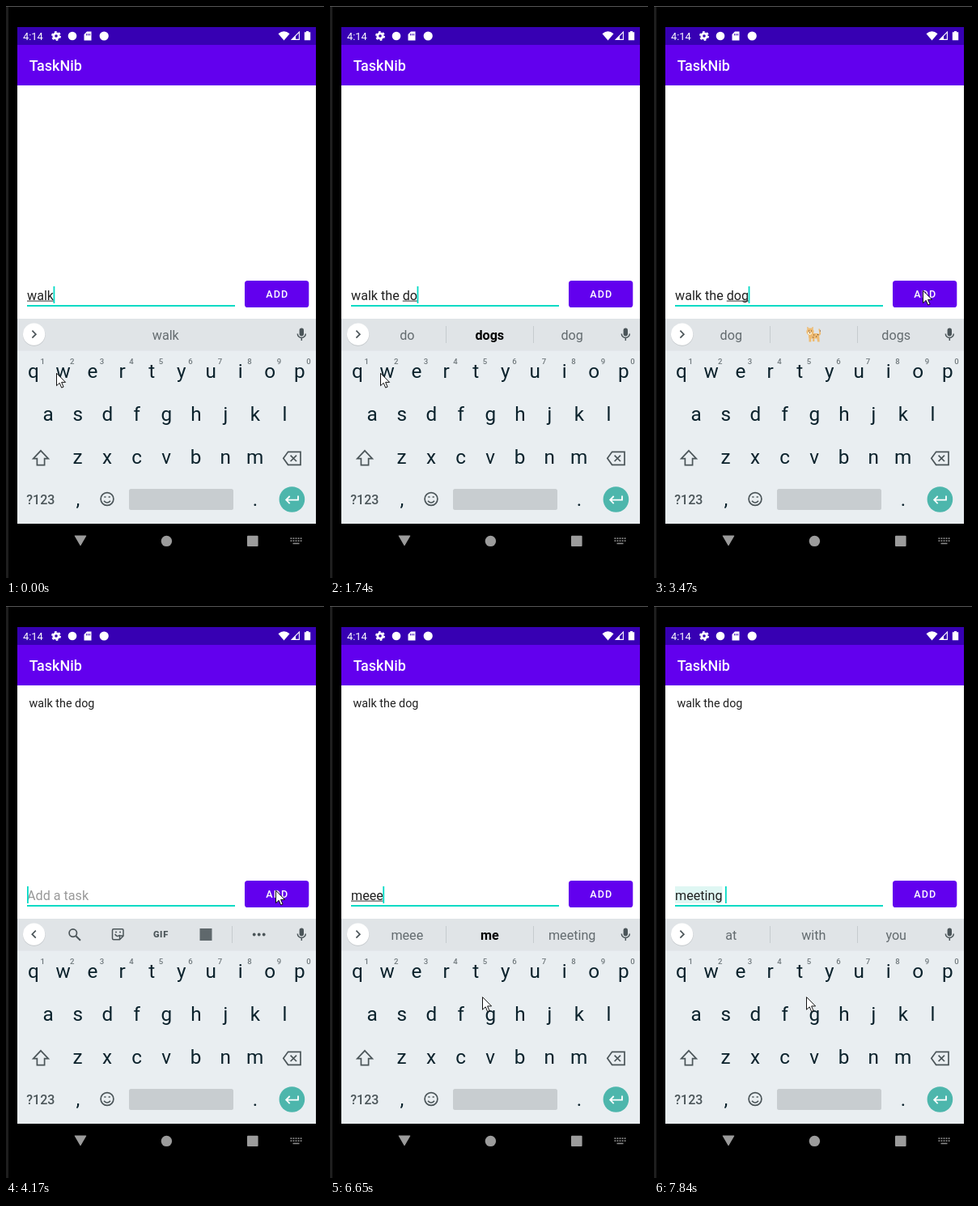
An HTML page that plays this animation: 393x706 px, repeating every 7.99 s.

```html
<!DOCTYPE html>
<html lang="en">
<head>
<meta charset="utf-8">
<title>Task list</title>
<style>
  html, body { margin: 0; width: 100%; height: 100%; overflow: hidden; background: #000; }
  svg { display: block; width: 393px; height: 706px; font-family: Roboto, sans-serif; }
  text { white-space: pre; }
  .mid { text-anchor: middle; }
  .line { fill: none; stroke: #4b5559; stroke-width: 1.7; }
</style>
</head>
<body>
<svg viewBox="0 0 393 706" xmlns="http://www.w3.org/2000/svg">
  <defs>
    <g id="mic" fill="#4b5559">
      <rect x="-2.7" y="-7.5" width="5.4" height="10" rx="2.7"/>
      <path d="M-5-.6a5 5 0 0 0 10 0M0 4.4V8" class="line" style="stroke-width:1.5"/>
    </g>
  </defs>
  <rect width="393" height="706"/>
  <path d="M0 .5H393" stroke="#555"/>
  <path d="M1.5 1V706" stroke="#1e1e1e" stroke-width="3"/>

  <!-- status bar -->
  <path fill="#3700b3" d="M14 26H383V48H14z"/>
  <g fill="#fff">
    <text x="21" y="42" font-size="12.8">4:14</text>
    <circle cx="62" cy="37" r="3.2" fill="none" stroke="#fff" stroke-width="2.8"/>
    <circle cx="62" cy="37" r="5.1" fill="none" stroke="#fff" stroke-width="1.8" stroke-dasharray="2.67"/>
    <circle cx="82" cy="37" r="5.3"/>
    <path d="M100 31.5h5.5v11h-9v-7.5z"/>
    <path d="M99.6 34.2v2.2M101.6 34.2v2.2M103.6 34.2v2.2" stroke="#3700b3" stroke-width="1"/>
    <circle cx="121.2" cy="37" r="5.6"/>
    <path d="M336.5 34.2Q343.5 28.5 350.5 34.2L343.5 42.5z"/>
    <path d="M362.4 32.2V41.4H353.2z" fill="none" stroke="#fff" stroke-width="1.1"/>
    <path d="M358 36.6V42H352.5z"/>
    <path d="M371 31h3v1.2h2.2V42.2h-7.4V32.2H371z"/>
  </g>

  <!-- app -->
  <path fill="#6200ee" d="M14 48H383V98H14z"/>
  <text x="28.7" y="79.7" font-size="17.94" font-weight="500" fill="#fff">TaskNib</text>
  <path fill="#fff" d="M14 98H383V386H14z"/>
  <text id="item" x="28.4" y="125" font-size="14.35" fill="#212121">walk the dog</text>
  <rect id="mark" x="26" y="346" height="21" fill="#dff7f3"/>
  <text id="entry" x="26" y="362.6" font-size="16.15"/>
  <rect id="under" y="363.6" height="1" fill="#333"/>
  <rect id="caret" y="346" width="1.8" height="21" fill="#03dac5"/>
  <path fill="#03dac5" d="M26 369H283V371H26z"/>
  <rect id="shade" x="293.5" y="339" width="82" height="36" rx="5" fill="#000"/>
  <rect x="295" y="339" width="79.3" height="33" rx="3.6" fill="#6200ee"/>
  <rect id="ripple" x="295" y="339" width="79.3" height="33" rx="3.6" fill="#fff"/>
  <text class="mid" x="335.3" y="360.2" font-size="12.56" font-weight="500" letter-spacing="1.12" fill="#fff">ADD</text>

  <!-- keyboard -->
  <path fill="#e0e4e7" d="M14 386H383V426H14z"/>
  <path fill="#e9eef1" d="M14 425.5H383V639H14z"/>
  <circle cx="34.7" cy="406" r="13.9" fill="#c9cdd0"/>
  <circle cx="34.6" cy="405.2" r="13.6" fill="#fff"/>
  <path id="chevron" class="line"/>
  <use href="#mic" x="365.3" y="405"/>

  <g id="words">
    <path id="bars" d="M143.5 395V416M251.5 395V416" stroke="#c6cbce"/>
    <text class="mid word" x="95.3" y="412"/>
    <text class="mid word" x="197.3" y="412"/>
    <text class="mid word" x="299.2" y="412"/>
    <g id="pet" fill="#eebb72">
      <circle cx="193" cy="402" r="4.6"/>
      <path d="M189 396l2.5 1-2 2.5zM197 396l-2.5 1 2 2.5z"/>
      <rect x="191" y="404" width="13" height="6.6" rx="2.5"/>
      <path d="M191.5 409v5.5h2.8V409zM196 409v5h2.4V409zM201 408l1 6.5h2.7l-.5-7z"/>
      <path d="M203 406.5q3-1 2-4t-.5-4" fill="none" stroke="#eebb72" stroke-width="1.8"/>
      <ellipse cx="192.5" cy="404" rx="2.6" ry="1.8" fill="#fff0d2"/>
      <path d="M191 401h1M194 401h1M192 403.3h1.2M197 406h1.2M200 408h1.2M202 405.6h1.2M196 409h1.2M205 401h1" stroke="#68432a" stroke-width="1.2"/>
    </g>
  </g>

  <g id="tools">
    <circle cx="82.8" cy="403.6" r="4.7" class="line"/>
    <path d="M86.3 407.2L92 412.8" class="line" style="stroke-width:2"/>
    <path d="M133 398.8h10.5q1.5 0 1.5 1.5v7l-4.5 4.5H133q-1.5 0-1.5-1.5v-10q0-1.5 1.5-1.5zM145 407h-4.5v4.5M134.7 405q2.7 4.5 6 1" class="line" style="stroke-width:1.5"/>
    <path d="M135 402.5h2M140 402.5h2" class="line"/>
    <text class="mid" x="191.4" y="409.2" font-size="11" font-weight="900" letter-spacing=".7" fill="#4b5559">GIF</text>
    <rect x="239.5" y="398" width="15" height="15" fill="#5f686c"/>
    <path d="M279.5 395V416" stroke="#c6cbce"/>
    <g fill="#4b5559"><circle cx="306.7" cy="405.5" r="1.9"/><circle cx="312.7" cy="405.5" r="1.9"/><circle cx="318.7" cy="405.5" r="1.9"/></g>
  </g>

  <g id="keys" class="mid" fill="#0b222c" font-size="24.3"></g>
  <path class="line" d="M43 548.8L52.3 558.6H47.6V566.6H38.4V558.6H33.7z"/>
  <path class="line" d="M348.6 550.3H364V566.3H348.6L342.8 558.3zM351.6 554.6l7.4 7.4M359 554.6l-7.4 7.4"/>
  <text class="mid" x="42.8" y="614.6" font-size="16" font-weight="500" fill="#4b5559">?123</text>
  <circle cx="125" cy="608.5" r="7.9" class="line"/>
  <path class="line" d="M121 610.7q4 4.6 8 0M121.3 606h2.2M126.6 606h2.2"/>
  <rect x="152" y="596" width="129" height="26" rx="2.5" fill="#c8cdd0"/>
  <circle cx="353.4" cy="609" r="15.8" fill="#4db6ac"/>
  <path d="M361 604.5V609.6H346.6M350.7 605L346.2 609.6L350.7 614.2" fill="none" stroke="#fff" stroke-width="1.8"/>

  <!-- navigation -->
  <g fill="#9c9c9c">
    <path d="M85.3 654H98.7L92 665.5z" stroke="#9c9c9c" stroke-width="1.2" stroke-linejoin="round"/>
    <circle cx="198.4" cy="660.4" r="6.7"/>
    <rect x="298" y="653.7" width="13.6" height="13.4" rx="1"/>
  </g>
  <path d="M351.5 657.2H365.5M351.5 660.2H365.5" stroke="#888" stroke-width="1.7" stroke-dasharray="1.8 1.25"/>
  <path d="M354.5 663.4H362.5" stroke="#888" stroke-width="1.6"/>

  <path id="pointer" d="M.5 .7V16.2L4.2 12.8L6.7 18.6L9.1 17.6L6.6 11.9H11.6z" fill="#fff" stroke="#111" stroke-width="1"/>
</svg>
<script>
const $ = id => document.getElementById(id);
const LOOP = 7990, LEFT = 26;

// Keyboard letters
const addKey = (char, x, y, extra = "") =>
  $("keys").insertAdjacentHTML("beforeend", `<text x="${x}" y="${y}" ${extra}>${char}</text>`);
const addRow = (chars, x, y) => [...chars].forEach((c, i) => addKey(c, x + i * 36.53, y));
addRow("qwertyuiop", 34, 459.3);
addRow("asdfghjkl", 52.2, 512.2);
addRow("zxcvbnm", 88.5, 565.3);
[..."1234567890"].forEach((c, i) =>
  addKey(c, 45.3 + i * 36.53, 441.8, 'font-size="9.6" font-weight="500" fill="#70797d"'));
addKey(",", 89, 617);
addKey(".", 308, 617);

// Each step changes only the listed fields; "done" is plain text, "comp" is underlined.
const steps = [
  [0, { done: "", comp: "walk", caret: 1, words: ["", "walk", ""], bold: 0, mouse: [62, 452.5], press: 0, item: 0, tools: 0, mark: 0 }],
  [120, { done: "walk ", comp: "", words: ["the", "with", "to"] }],
  [370, { comp: "t" }],
  [520, { comp: "th", words: ["th", "the", "through"], bold: 1 }],
  [820, { comp: "the", words: ["the", "they", "then"], bold: 0 }],
  [940, { done: "walk the ", comp: "", words: ["dog", "dogs", "house"] }],
  [1370, { caret: 0 }],
  [1620, { comp: "d", caret: 1, words: ["d", "dog", "dogs"] }],
  [1740, { comp: "do", words: ["do", "dogs", "dog"], bold: 1 }],
  [2170, { comp: "dog", words: ["dog", "pet", "dogs"], bold: 0 }],
  [2750, { caret: 0 }],
  [2890, { mouse: [76, 451] }],
  [3020, { mouse: [118, 448] }],
  [3170, { caret: 1, mouse: [308, 351] }],
  [3320, { mouse: [317, 351] }],
  [3470, { mouse: [332, 350.5] }],
  [3620, { mouse: [333, 350.5] }],
  [3770, { press: 1 }],
  [3890, { press: .8, done: "", comp: "" }],
  [4020, { press: .3, item: .5, tools: 1 }],
  [4170, { press: 0, item: 1 }],
  [4300, { mouse: [310, 380] }],
  [4450, { caret: 0, mouse: [188, 482] }],
  [4990, { caret: 1 }],
  [5410, { caret: 0 }],
  [5950, { comp: "m", caret: 1, tools: 0, words: ["m", "my", "movie"] }],
  [6260, { comp: "me", words: ["me", "meet", "meeting"] }],
  [6380, { comp: "mee", words: ["mee", "me", "meeting"], bold: 1 }],
  [6650, { comp: "meee", words: ["meee", "me", "meeting"] }],
  [7050, { comp: "meeet", words: ["meeet", "meet", "meeting"] }],
  [7170, { comp: "meeeti", words: ["meeeti", "meeting", "meetings"] }],
  [7290, { comp: "meeetin", words: ["meeetin", "meeting", "meetings"] }],
  [7410, { comp: "meeeting", words: ["meeeting", "meeting", "meetings"] }],
  [7720, { done: "meeting ", comp: "", mark: 1 }],
  [7840, { words: ["at", "with", "you"], bold: 0 }]
];

const pen = document.createElement("canvas").getContext("2d");
const widthOf = text => {
  pen.font = "16.15px Roboto, sans-serif";
  return pen.measureText(text).width;
};
const set = (id, attrs) => Object.entries(attrs).forEach(([k, v]) => $(id).setAttribute(k, v));
const show = (id, on) => set(id, { opacity: +on });

function draw(time) {
  const s = Object.assign({}, ...steps.filter(([at]) => time >= at).map(([, change]) => change));
  const text = s.done + s.comp;
  const start = LEFT + widthOf(s.done), end = LEFT + widthOf(text);

  $("entry").textContent = text || "Add a task";
  set("entry", { fill: text ? "#212121" : "#999" });
  set("under", { x: start, width: end - start });
  set("caret", { x: text ? end - .5 : LEFT, opacity: s.caret });
  set("mark", { width: s.mark ? widthOf(s.done.trim()) : 0 });

  show("item", s.item);
  set("ripple", { opacity: s.press * .24 });
  set("shade", { opacity: s.press * .2 });

  show("tools", s.tools);
  show("words", !s.tools);
  set("chevron", { d: s.tools ? "M36.8 400.7L32.3 405.2L36.8 409.7" : "M32.4 400.7L36.9 405.2L32.4 409.7" });
  const pet = s.words[1] === "pet";
  show("pet", pet);
  show("bars", s.words[0]);
  document.querySelectorAll(".word").forEach((el, i) => {
    const strong = s.bold && i === 1;
    el.textContent = pet && i === 1 ? "" : s.words[i];
    el.setAttribute("font-size", 16.15);
    el.setAttribute("font-weight", strong ? 700 : 400);
    el.setAttribute("fill", strong ? "#000" : "#636b6f");
  });
  set("pointer", { transform: `translate(${s.mouse})` });
}

const born = performance.now();
function tick() {
  draw((performance.now() - born) % LOOP);
  requestAnimationFrame(tick);
}
tick();
</script>
</body>
</html>
```
